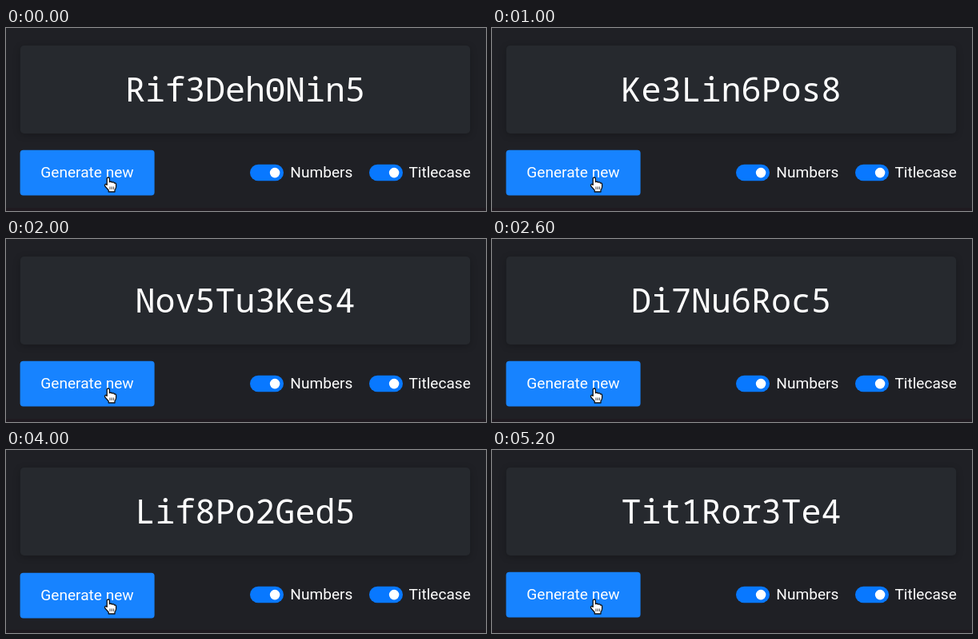
An HTML page with a canvas for the animation above (5.5 s loop, 600 by 229 pixels).

```html
<!DOCTYPE html>
<html lang="en">
<head>
<meta charset="utf-8">
<title>Password generator</title>
<style>
  html, body { margin: 0; width: 100%; height: 100%; overflow: hidden; background: #1f2025; }
  canvas { display: block; }
</style>
</head>
<body>
<canvas id="stage" width="600" height="229"></canvas>
<script>
const ctx = document.getElementById('stage').getContext('2d');
const LOOP = 5500;
const FIRST_WORD = 'Rif3Deh0Nin5';
const WORD_SIZE = 41.7;

// Each click: mouse down (ms), mouse up (ms), word shown on release
const clicks = [
  [400, 500, 'Dom4Fuv4Zu2'],
  [900, 1000, 'Ke3Lin6Pos8'],
  [1100, 1200, 'Sed7Bu8Mop3'],
  [1400, 1600, 'Fal2Ri5Gub6'],
  [1900, 2000, 'Nov5Tu3Kes4'],
  [2100, 2200, 'Be8Mif2Sog7'],
  [2300, 2400, 'Pul4De6Hab3'],
  [2500, 2600, 'Di7Nu6Roc5'],
  [2700, 2800, 'Zet2Ko7Mib4'],
  [2900, 3000, 'Gu5Fop3Lan8'],
  [3100, 3200, 'Hes6Vi4Tud2'],
  [3300, 3400, 'Ma6De5Lup5'],
  [3500, 3600, 'Rob3Su7Nef6'],
  [3800, 3900, 'Lif8Po2Ged5'],
  [4000, 4100, 'Tek6Ke5Gys6'],
  [4500, 4700, 'Vo4Bus7Din3'],
  [5000, 5200, 'Tit1Ror3Te4']
];

function box(x, y, w, h, radius, color) {
  ctx.fillStyle = color;
  ctx.beginPath();
  ctx.roundRect(x, y, w, h, radius);
  ctx.fill();
}

function label(text, x, y, align) {
  ctx.font = '19.1px Roboto, sans-serif';
  ctx.textAlign = align;
  ctx.fillStyle = '#fff';
  ctx.fillText(text, x, y);
}

function toggle(x) {
  box(x, 170.7, 42, 20.6, 10.3, '#0878ff');
  box(x + 24.8, 174.8, 12.6, 12.6, 6.3, '#fff');
}

function drawWord(word) {
  const advance = WORD_SIZE * 0.6;
  const left = 299 - (word.length - 1) * advance / 2;
  ctx.textAlign = 'center';
  ctx.fillStyle = '#fff';
  [...word].forEach((char, i) => {
    // Liberation Mono has the dotted zero
    ctx.font = char === '0'
      ? '45px "Liberation Mono", monospace'
      : `${WORD_SIZE}px "Noto Sans Mono", monospace`;
    ctx.fillText(char, left + i * advance, 92);
  });
}

const hand = new Path2D(
  'M126.2 196.4 V188.8 Q126.2 187 127.8 187 Q129.4 187 129.4 188.8 V192.7' +
  ' Q131.6 191.5 132.6 193.2 Q134.6 192.3 135.4 194.1 Q137.6 193.5 137.6 195.9' +
  ' V198.6 Q137.6 201 136 202.6 V205 H128.2 V203 L123.8 198' +
  ' Q122.9 196.4 124 195.7 Q125.2 195.1 126.2 196.4 Z');
const knuckles = new Path2D('M130 198.5 V202 M132.3 198.5 V202 M134.6 198.5 V202');

function drawCursor() {
  ctx.fillStyle = '#fff';
  ctx.strokeStyle = '#111';
  ctx.lineWidth = 1.3;
  ctx.lineJoin = 'round';
  ctx.fill(hand);
  ctx.stroke(hand);
  ctx.lineWidth = 0.8;
  ctx.stroke(knuckles);
}

function draw(time) {
  const released = clicks.filter(([, up]) => time >= up);
  const word = released.length ? released[released.length - 1][2] : FIRST_WORD;
  const press = clicks.some(([down, up]) => time >= down && time < up) ? 1 : 0;

  ctx.fillStyle = '#1f2025';
  ctx.fillRect(0, 0, 600, 229);
  ctx.fillStyle = '#1f1a20';
  ctx.fillRect(0, 225, 600, 4);

  ctx.save();
  ctx.shadowColor = 'rgba(0, 0, 0, 0.22)';
  ctx.shadowBlur = 10;
  ctx.shadowOffsetY = 2;
  box(17.8, 22, 562.4, 110, 5, '#26292e');
  ctx.restore();
  drawWord(word);

  box(17.6, 152.8, 168, 56.6, 4, '#1783ff');
  if (press) {
    ctx.fillStyle = '#1f2025';
    ctx.fillRect(17, 152, 170, 59);
    box(17.6, 153.8, 168, 56.6, 4, '#1783ff');
  }
  label('Generate new', 101.5, 187.2 + press, 'center');

  toggle(305);
  label('Numbers', 355.3, 187.2, 'left');
  toggle(454);
  label('Titlecase', 503.4, 187.2, 'left');
  drawCursor();
}

function tick() {
  draw(performance.now() % LOOP);
  requestAnimationFrame(tick);
}
tick();
</script>
</body>
</html>
```
